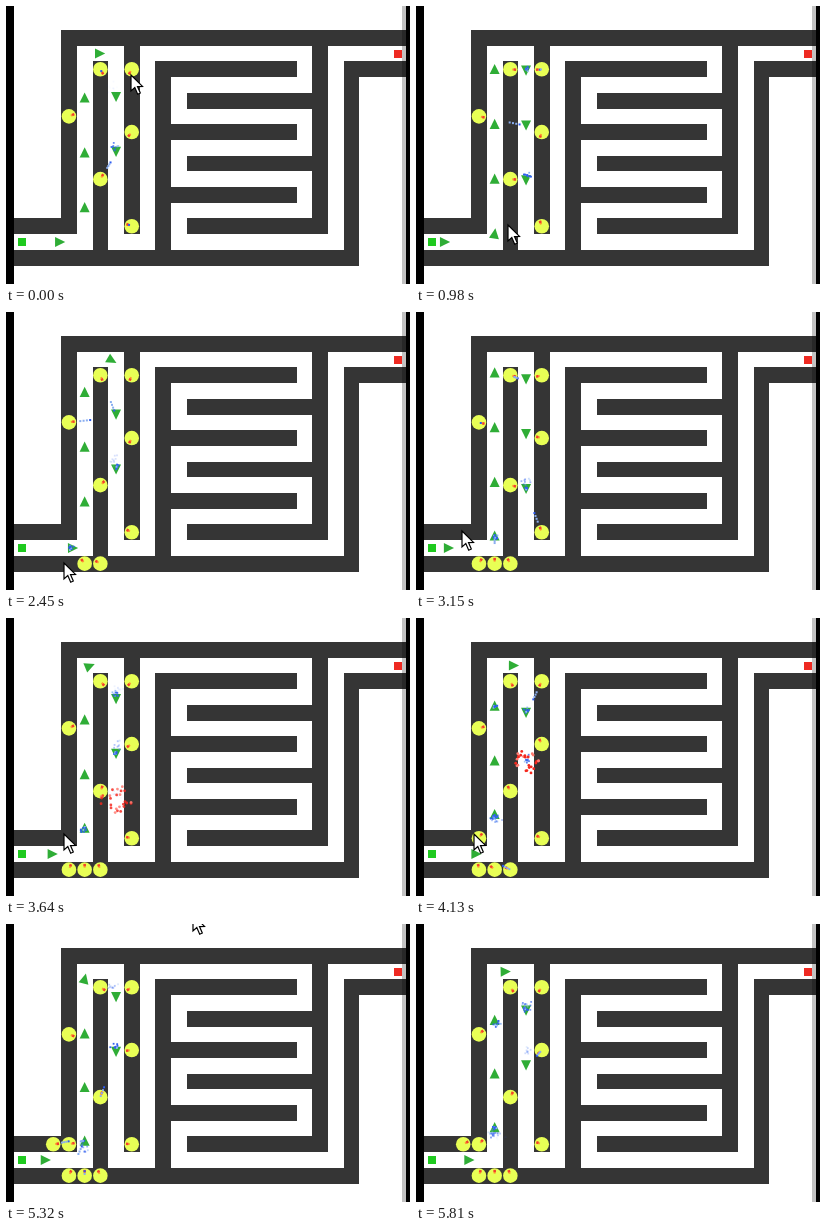
Animation, 404 px wide and 278 px high, one loop 5880 ms. Source, as an HTML page with a canvas:

```html
<!DOCTYPE html>
<html lang="en">
<head>
<meta charset="utf-8">
<title>Tower defense</title>
<style>
html, body { margin: 0; width: 100%; height: 100%; overflow: hidden; background: #fff; }
canvas { display: block; width: 404px; height: 278px; }
</style>
</head>
<body>
<canvas id="stage" width="404" height="278"></canvas>
<script>
const ctx = document.getElementById('stage').getContext('2d');
const LOOP = 5880, STEP = 70, CELL = 15.7, LEFT = 8, TOP = 24;
const RANGE = 51, FIRE_GAP = 770, FLIGHT = 170, BURST = 420, BLAST = 480;

const cellX = col => LEFT + CELL * (col + 0.5);
const cellY = row => TOP + CELL * (row + 0.5);

// Walls: column, row, width, height in cells
const walls = [
  [3, 0, 22, 1], [3, 0, 1, 13], [0, 12, 4, 1], [0, 14, 22, 1],
  [5, 2, 1, 13], [7, 0, 1, 13], [9, 2, 1, 13],
  [9, 2, 9, 1], [11, 4, 9, 1], [9, 6, 9, 1], [11, 8, 9, 1], [9, 10, 9, 1], [11, 12, 9, 1],
  [19, 0, 1, 13], [21, 2, 1, 13], [21, 2, 4, 1]
];

// Towers: column, row, resting angle, time built
const towers = [
  [3, 5, -0.8], [5, 2, 1.1], [7, 2, 2], [7, 6, 2], [5, 9, -0.9], [7, 12, -2.7],
  [5, 14, -2.2, 1470], [4, 14, -0.8, 2100], [3, 14, -0.7, 2700],
  [3, 12, -0.8, 3660], [2, 12, -0.4, 4480]
].map(([col, row, rest, built = -Infinity], id) =>
  ({ x: cellX(col), y: cellY(row), rest, built, id }));

const deaths = { 4: 3920, 5: 3360, 6: 1400 };
const travelKeys = [[-1000, -28], [0, 0], [770, 21.5], [980, 28.5], [1190, 31.5], [2450, 66.5],
  [3150, 86], [4130, 113.5], [5320, 146.5], [5880, 162]];
const cursorKeys = [[0, 125, 69], [560, 117, 150], [980, 92, 219], [1400, 92, 250], [1750, 89, 251],
  [2030, 77, 254], [2200, 75, 254], [2450, 58, 251], [2750, 59, 251], [3150, 46, 219],
  [3600, 58, 216], [4130, 58, 216], [4400, 45, 217], [4620, 47, 214], [4900, 127, 29],
  [5320, 187, -9], [5500, 191, -24], [5880, 191, -30]];

function track(keys, t) {
  let i = 1;
  while (i < keys.length - 1 && keys[i][0] < t) i++;
  const a = keys[i - 1], b = keys[i], u = (t - a[0]) / (b[0] - a[0]);
  return a.slice(1).map((v, n) => v + (b[n + 1] - v) * u);
}

function random(seed) {
  const v = Math.sin(seed * 127.1 + 11.7) * 43758.5453;
  return v - Math.floor(v);
}

// Route: along the entry, up, across and down, with rounded corners
const R = CELL / 2, TURN = 11.1, UP = 55, CROSS = 238.8, DOWN = 265.6;
function route(s) {
  const corner = d => Math.min(d / TURN, 1) * Math.PI / 2;
  if (s < UP) return [15.85 + s, cellY(13)];
  if (s < CROSS) {
    const a = corner(s - UP);
    return [cellX(4) - R + R * Math.sin(a),
      cellY(13) - R + R * Math.cos(a) - Math.max(0, s - UP - TURN)];
  }
  if (s < DOWN) {
    const a = corner(s - CROSS);
    return [cellX(4) + R - R * Math.cos(a) + Math.max(0, s - CROSS - TURN),
      cellY(1) + R - R * Math.sin(a)];
  }
  const a = corner(s - DOWN);
  return [cellX(6) - R + R * Math.sin(a),
    cellY(1) + R - R * Math.cos(a) + Math.max(0, s - DOWN - TURN)];
}

const distance = (k, t) => 38.2 + k * (k > 0 ? 54.8 : 53.6) + track(travelKeys, t)[0];
const enemyAt = (k, t) => route(distance(k, t));
const alive = (k, t) => distance(k, t) >= 0 && !(t >= deaths[k]);

// The most advanced enemy within reach
function findTarget(tower, t) {
  for (let k = 6; k >= -3; k--) {
    if (!alive(k, t)) continue;
    const [x, y] = enemyAt(k, t);
    if (Math.hypot(x - tower.x, y - tower.y) < RANGE) return k;
  }
  return null;
}

function rect(color, x, y, w, h) {
  ctx.fillStyle = color;
  ctx.fillRect(x, y, w, h);
}

function disc(color, x, y, r) {
  ctx.fillStyle = color;
  ctx.beginPath();
  ctx.arc(x, y, r, 0, Math.PI * 2);
  ctx.fill();
}

function polygon(points) {
  ctx.beginPath();
  points.forEach(([x, y]) => ctx.lineTo(x, y));
  ctx.closePath();
}

function drawMap() {
  rect('#fff', 0, 0, 404, 278);
  for (const [col, row, w, h] of walls) {
    const x = Math.round(LEFT + col * CELL), y = Math.round(TOP + row * CELL);
    rect('#353535', x, y, Math.round(LEFT + (col + w) * CELL) - x,
      Math.round(TOP + (row + h) * CELL) - y);
  }
  rect('#1fca1f', 12, 232, 8, 8);
  rect('#ee2a22', 388, 44, 8, 8);
}

function drawFrame() {
  rect('rgba(0,0,0,.24)', 396, 0, 4, 278);
  rect('#000', 0, 0, 8, 278);
  rect('#000', 400, 0, 4, 278);
}

function drawEnemy(k, t) {
  const s = distance(k, t), [x, y] = route(s);
  const [x0, y0] = route(s - 5), [x1, y1] = route(s + 5);
  ctx.save();
  ctx.translate(x, y);
  ctx.rotate(Math.atan2(y1 - y0, x1 - x0));
  ctx.fillStyle = '#2fad36';
  polygon([[5.2, 0], [-5, -5], [-5, 5]]);
  ctx.fill();
  ctx.restore();
}

function drawTower(tower, t) {
  const k = findTarget(tower, t);
  let angle = tower.rest;
  if (k !== null) {
    const [x, y] = enemyAt(k, t);
    angle = Math.atan2(y - tower.y, x - tower.x);
  }
  disc('#e8ff55', tower.x, tower.y, 7.3);
  ctx.save();
  ctx.translate(tower.x, tower.y);
  ctx.rotate(angle);
  rect('#ff9a30', 2, -1, 1.6, 2);
  rect('#f5402a', 3.4, -1.3, 2.4, 2.6);
  ctx.restore();
}

function drawShots(tower, t) {
  const phase = random(tower.id + 3) * FIRE_GAP;
  const last = Math.floor((t - phase) / FIRE_GAP);
  for (let n = last - 1; n <= last; n++) {
    const fired = n * FIRE_GAP + phase, age = t - fired;
    if (fired < tower.built || age > FLIGHT + BURST) continue;
    const k = findTarget(tower, fired);
    if (k === null) continue;
    const [x, y] = enemyAt(k, fired + FLIGHT);
    const dx = x - tower.x, dy = y - tower.y, seed = tower.id * 31 + n * 7;
    if (age < FLIGHT) {
      for (let i = 0; i < 4; i++) {
        const u = age / FLIGHT - i * 0.07;
        if (u > 0) rect(i ? '#8aaef0' : '#2d5bf0', tower.x + dx * u - 1, tower.y + dy * u - 1, 2, 2);
      }
      continue;
    }
    const u = (age - FLIGHT) / BURST, reach = Math.hypot(dx, dy);
    ctx.globalAlpha = Math.min(1, 1.6 * (1 - u));
    for (let i = 0; i < 10; i++) {
      const a = random(seed + i * 1.7) * Math.PI * 2, r = random(seed + i * 2.3) * (2 + 6 * u);
      rect(i % 4 ? '#2f5fee' : '#8ab4f4', x + dx / reach * 4 * u + Math.cos(a) * r - 0.9,
        y + dy / reach * 4 * u + Math.sin(a) * r - 0.9, 1.8, 1.8);
    }
    ctx.globalAlpha = 1;
  }
}

function drawBlast(k, t) {
  const u = (t - deaths[k]) / BLAST;
  if (u < 0 || u > 1) return;
  const [x, y] = enemyAt(k, deaths[k]);
  ctx.globalAlpha = Math.min(1, 2 * (1 - u));
  for (let i = 0; i < 26; i++) {
    const a = random(k + i * 3.1) * Math.PI * 2;
    const r = (0.35 + random(k + i * 5.3) * 0.65) * (3 + 22 * u);
    disc(i % 3 ? '#f5281e' : '#ff7a70', x + Math.cos(a) * r, y + Math.sin(a) * r, 1.4);
  }
  ctx.globalAlpha = 1;
}

function drawCursor(t) {
  const [x, y] = track(cursorKeys, t);
  ctx.save();
  ctx.translate(x, y);
  polygon([[0, 0], [0, 16], [3.8, 12.6], [6.7, 19.2], [9.3, 18], [6.5, 11.6], [11.5, 11.4]]);
  ctx.fillStyle = '#fff';
  ctx.strokeStyle = '#000';
  ctx.lineWidth = 1.2;
  ctx.fill();
  ctx.stroke();
  ctx.restore();
}

function draw(t) {
  drawMap();
  towers.filter(tower => t >= tower.built).forEach(tower => drawTower(tower, t));
  for (let k = -3; k <= 6; k++) if (alive(k, t)) drawEnemy(k, t);
  towers.forEach(tower => drawShots(tower, t));
  Object.keys(deaths).forEach(k => drawBlast(Number(k), t));
  drawFrame();
  drawCursor(t);
}

// The picture advances in even steps, apart from two short stalls
function stepTime(t) {
  if (t >= 770 && t < 1190) return t < 980 ? 770 : 980;
  return Math.floor(t / STEP) * STEP;
}

const start = performance.now();
function tick() {
  draw(stepTime((performance.now() - start) % LOOP));
  requestAnimationFrame(tick);
}
tick();
</script>
</body>
</html>
```
